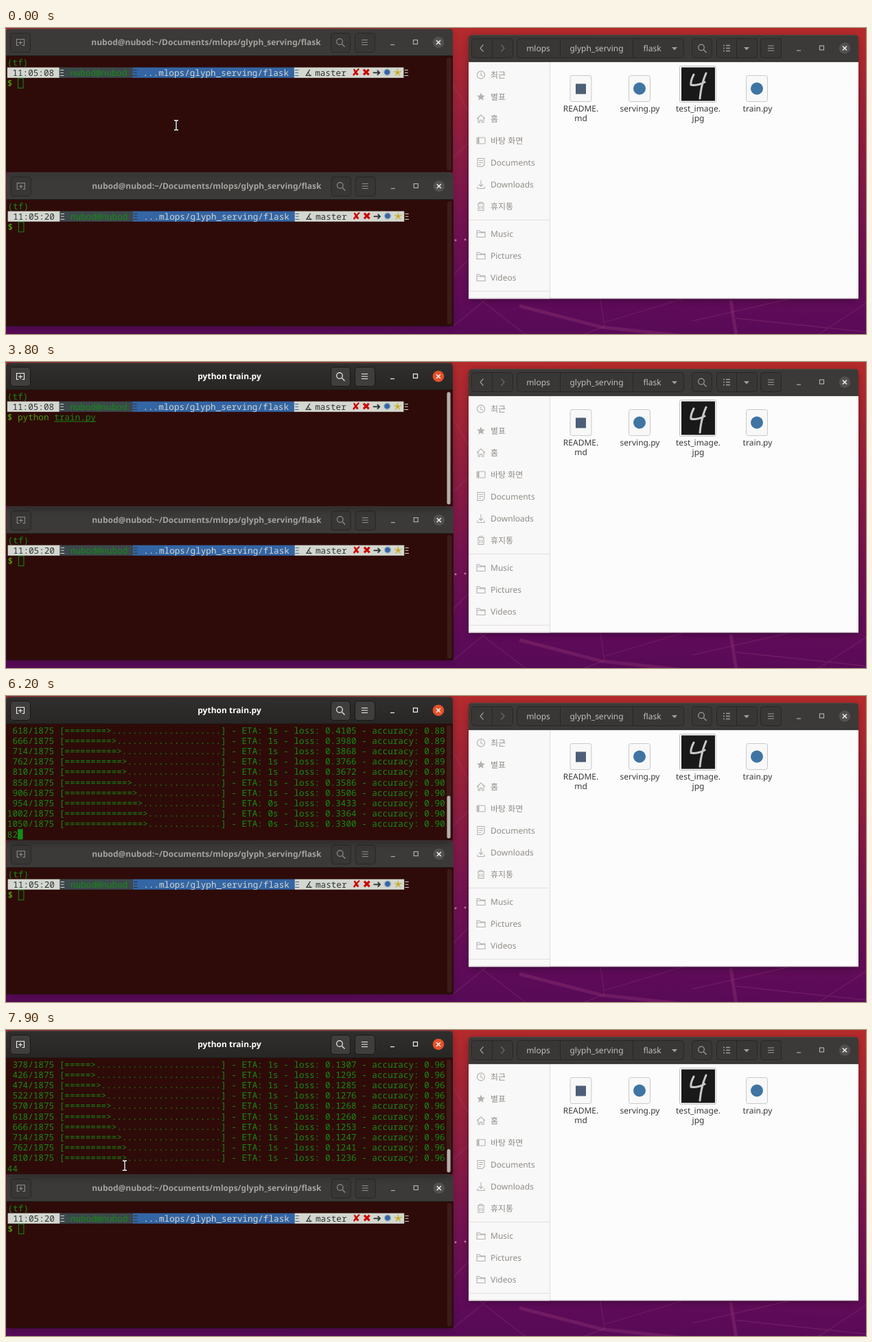
An HTML page that plays this animation: 1253 by 447 pixels, repeating every 8 s.

```html
<!DOCTYPE html>
<html lang="ko">
<head>
<meta charset="utf-8">
<title>Training run</title>
<style>
  html, body { margin: 0; width: 100%; height: 100%; overflow: hidden; background: #5d0c57; }
  svg { display: block; width: 1253px; height: 447px; }
  text { white-space: pre; text-rendering: geometricPrecision; }
  .ui { font: 12px "Noto Sans", "Noto Sans CJK KR", "Noto Sans CJK", "Open Sans", sans-serif; }
  .title { font-weight: 700; }
  .mono { font: 12.667px "Noto Sans Mono", "DejaVu Sans Mono", monospace; }
  .sym { font: 15px "DejaVu Sans", sans-serif; }
  .bold { font-weight: 700; }
</style>
</head>
<body>
<svg viewBox="0 0 1253 447">
  <defs>
    <linearGradient id="sky" x1="0.55" y1="0" x2="0.45" y2="1">
      <stop offset="0" stop-color="#b52b2c"/>
      <stop offset="0.3" stop-color="#93203c"/>
      <stop offset="0.6" stop-color="#75144e"/>
      <stop offset="0.88" stop-color="#5e0b59"/>
      <stop offset="1" stop-color="#560a56"/>
    </linearGradient>
    <linearGradient id="active" x1="0" y1="0" x2="0" y2="1">
      <stop offset="0" stop-color="#302f2e"/>
      <stop offset="1" stop-color="#272625"/>
    </linearGradient>
    <filter id="soft" x="-10%" y="-20%" width="120%" height="140%"><feGaussianBlur stdDeviation="6"/></filter>
    <path id="beam" d="M-3-7H-1L0-6 1-7H3M0-6V6M-3 7H-1L0 6 1 7H3" fill="none"/>
  </defs>
  <g id="base"></g>
  <g id="front"></g>
  <g id="mouse">
    <use href="#beam" stroke="#111" stroke-width="3"/>
    <use href="#beam" stroke="#fff" stroke-width="1.3"/>
  </g>
</svg>
<script>
const LOOP = 8000, STEP = 100;
const CW = 7.6, RH = 15.2, ROWS = 11, COLS = 84;
const BG = '#2e0b08', GREEN = '#168a16', LIME = '#4e9a06', RED = '#cc0000';
const LIGHT = '#d3d7cf', DARK = '#2e3436', SLATE = '#3c484b', BLUE = '#3465a4', DIM = '#555753';
const USER = 'nubod@nubod', DIR = 'mlops/glyph_serving/flask';
const PATH_TITLE = `${USER}:~/Documents/${DIR}`;
const COMMAND = 'python train.py';

// Drawing helpers
const esc = s => s.replace(/&/g, '&amp;').replace(/</g, '&lt;').replace(/>/g, '&gt;');
const rect = (x, y, w, h, fill, more = '') =>
  `<rect x="${x}" y="${y}" width="${w}" height="${h}" fill="${fill}" ${more}/>`;
const line = (d, color, w = 1, more = '') =>
  `<path d="${d}" fill="none" stroke="${color}" stroke-width="${w}" ${more}/>`;
const label = (x, y, s, fill, anchor = 'start', cls = 'ui') =>
  `<text class="${cls}" x="${x}" y="${y}" fill="${fill}" text-anchor="${anchor}">${esc(s)}</text>`;
const circle = (x, y, r, fill, more = '') => `<circle cx="${x}" cy="${y}" r="${r}" fill="${fill}" ${more}/>`;
const at = (x, y, s) => `<g transform="translate(${x} ${y})">${s}</g>`;
const shadow = (x, y, w, h, o) => rect(x, y, w, h, '#000', `filter="url(#soft)" opacity="${o}"`);

// Window chrome
function button(x, y, w, active) {
  return rect(x + .5, y + .5, w - 1, 28, active ? '#3f3e3c' : '#383735',
    `rx="4" stroke="${active ? '#191817' : '#292726'}"`);
}
const lens = (x, y, c) => line(`M${x + 2.5} ${y + 2.5}l4 4`, c, 1.3) + circle(x - 1, y - 1, 4.3, 'none', `stroke="${c}" stroke-width="1.2"`);
const burger = (x, y, c) => line(`M${x - 4.5} ${y - 3.5}h9m-9 3.5h9m-9 3.5h9`, c, 1.2);
function controls(x, y, active) {
  const c = active ? '#f2f0ee' : '#b0ada9';
  return line(`M${x - 70} ${y + 3.5}h6`, c, 1.2) +
    rect(x - 36.5, y - 3.5, 6, 6, 'none', `stroke="${c}" stroke-width="1.2"`) +
    circle(x, y, 8.3, active ? '#e4512a' : '#53514f') +
    line(`M${x - 3} ${y - 3}l6 6m0-6l-6 6`, '#f4f2f0', 1.5);
}
function termWindow(h, title, active, content) {
  const c = active ? '#f2f0ee' : '#918e8b';
  const titleX = title === COMMAND ? 325.5 : 291.5;
  return shadow(2, 4, 647, h - 2, active ? .4 : .2) +
    rect(0, 41, 651, h - 41, BG) +
    `<path d="M0 41V7Q0 1 6 1H645Q651 1 651 7V41Z" fill="${active ? 'url(#active)' : '#3b3a38'}"/>` +
    line('M5 1.5H646', active ? '#454341' : '#4a4846') +
    line('M0 40.5H651', '#1e1b1a') +
    line(`M.5 41V${h - .5}H650.5V41`, '#241210') +
    button(6, 7, 30, active) + button(473, 7, 29, active) + button(508, 7, 30, active) +
    line('M18.5 25.5H15.5V16.5H26.5V25.5H23.5M21 18.5v6m-3-3h6', c, 1.1) +
    lens(487, 21, c) + burger(522.5, 21, c) + controls(630, 21, active) +
    label(titleX, 25.3, title, active ? '#fff' : '#a5a29f', 'middle', 'ui title') + content;
}

// Terminal cells
const colX = c => +(1.8 + c * CW).toFixed(2);
const rowY = r => +(42.4 + r * RH).toFixed(2);
const put = (c, r, s, fill = GREEN, cls = 'mono') => label(colX(c), rowY(r) + 12.2, s, fill, 'start', cls);
const cells = (c, r, n, fill) => rect(colX(c), rowY(r), n * CW, RH, fill);
const hollow = (c, r) => rect(colX(c) + .5, rowY(r) + .5, CW, RH - .7, 'none', `stroke="${GREEN}"`);

function prompt(r, clock) {
  const icons = [['✘', RED], ['✖', RED], ['➜', DARK], ['✹', BLUE], ['✭', '#c4a000']];
  return cells(0, r, 10, LIGHT) + cells(10, r, 14, SLATE) + cells(24, r, 31, BLUE) + cells(55, r, 21, LIGHT) +
    put(1, r, clock, DARK) + put(10, r, 'Ξ', LIGHT) + put(12, r, USER) +
    put(24, r, 'Ξ', DARK) + put(26, r, '...' + DIR, LIGHT) + put(55, r, 'Ξ', BLUE) +
    put(57, r, '∡', DARK) + put(59, r, 'master', DARK) + put(76, r, 'Ξ', LIGHT) +
    icons.map(([s, c], i) => put(66 + 2 * i, r, s, c, 'sym')).join('');
}

// Training log: loss and error fall as powers of the batch number
const TOTAL = 1875, LAST = 40;
const RUN = 5000, UPDATE = 47.4;

function progress(i) {
  const first = i <= LAST, k = first ? i : i - LAST - 1;
  const n = Math.min(TOTAL, Math.max(1, 48 * k - 6)), done = n === TOTAL;
  const loss = first ? Math.min(2.4565, 5.797 * n ** -.412) : .202 * n ** -.0734;
  const error = first ? Math.min(.875, 1.365 * n ** -.388) : .045 * n ** -.035;
  const w = Math.floor(30 * n / TOTAL);
  const bar = (w ? '='.repeat(w - 1) + (done ? '=' : '>') : '') + '.'.repeat(30 - w);
  const left = i === 0 ? '7:14' : n < 100 ? '2s' : n < 940 ? '1s' : '0s';
  const time = done ? '2s 1ms/step' : 'ETA: ' + left;
  return `${String(n).padStart(4)}/${TOTAL} [${bar}] - ${time} - loss: ${loss.toFixed(4)} - accuracy: ${(1 - error).toFixed(4)}`;
}

// Key presses in tenths of a second; the cursor blink restarts at each event
const KEYS = [12, 13, 14, 15, 19, 20, 22, 23, 23, 24, 26, 28, 30, 31, 31].map(k => k * 100);
const FOCUS = 350, ENTER = 3150, REPLY = 3500, BLINK = 612;
function cursorOn(t) {
  const last = Math.max(...[FOCUS, ...KEYS, ENTER].filter(k => k <= t));
  return Math.floor((t - last) / BLINK) % 2 === 0;
}

function commandLine(r, t) {
  const n = KEYS.filter(k => k <= t).length, word = n >= 6;
  let s = put(0, r, '$', LIME, 'mono bold');
  if (t < FOCUS) return s + hollow(2, r);
  s += put(2, r, COMMAND.slice(0, Math.min(n, 6)), word ? LIME : RED, word ? 'mono' : 'mono bold');
  if (n > 7) {
    s += put(9, r, COMMAND.slice(7, n)) + rect(colX(9), rowY(r) + 13.6, (n - 7) * CW, 1, GREEN);
  }
  if (n) s += put(2 + n, r, COMMAND.slice(n), DIM);
  if (t < REPLY && cursorOn(t)) {
    const hint = n && n < COMMAND.length;
    s += cells(2 + n, r, 1, hint ? '#6a6c69' : GREEN);
    if (hint) s += put(2 + n, r, COMMAND[n], BG);
  }
  return s;
}

function terminal(t) {
  const rows = [r => put(0, r, '(tf)'), r => prompt(r, '11:05:08'), r => commandLine(r, t)];
  const say = s => rows.push(r => put(0, r, s));
  let tail = '';
  if (t >= RUN) say('Epoch 1/5');
  const count = t > RUN ? Math.max(1, Math.floor((t - RUN - 100) / UPDATE)) : 0;
  for (let i = 0; i < count; i++) {
    const s = progress(i);
    say(s.slice(0, COLS));
    tail = s.slice(COLS);
    if (i === LAST) {
      say(tail);
      say('Epoch 2/5');
      tail = '';
    }
  }
  if (t >= REPLY) {
    rows.push(r => put(0, r, tail) + (cursorOn(t) ? cells(tail.length, r, 1, GREEN) : ''));
  }
  const total = rows.length;
  const thumb = total < ROWS ? 164 : Math.max(34, 164 * ROWS / (total + 1));
  const bar = rect(642, 43, 7, 165, '#3c1b18', 'rx="3"') +
    (t >= FOCUS ? rect(642.5, 208 - thumb, 5, thumb, '#b5b0ac', 'rx="2.5"') : '');
  return rows.slice(-ROWS).map((f, r) => f(r)).join('') + bar;
}

// Desktop and file manager
function wallpaper() {
  const c = '#c25a8c', faint = 'opacity=".2"';
  return rect(0, 0, 1253, 447, 'url(#sky)') +
    line('M748 406L868 437L990 450M1056 398L1064 450', c, 5, faint) +
    line('M651 436L700 396M690 396L760 450M866 396L872 436L835 450M872 430L985 396M1000 428L1140 396M1064 424L1253 444M1180 450L1253 402', c, 1.3, faint) +
    line('M651 82L674 122M651 190L674 168M651 362L674 338', c, 1.3, faint) +
    circle(655, 310, 1.5, '#c67ba2') + circle(669, 309, 1.5, '#c67ba2');
}

function sidebar() {
  const g = '#b3b1ae';
  const folder = line('M-6-4.5h4l1.5 2h6.5v7.5h-12zM-6-1.5h12', g, 1.1);
  const items = [
    ['최근', circle(0, 0, 5.6, 'none', `stroke="${g}" stroke-width="1.1"`) + line('M0-3.5V.5L3 2', g, 1.1)],
    ['별표', `<path d="M0-6L1.7-2 6-1.8 2.7 1 3.8 5.2 0 2.9-3.8 5.2-2.7 1-6-1.8-1.7-2Z" fill="${g}"/>`],
    ['홈', line('M-6 0L0-5.5 6 0M-4-1V5.5H-1.5V2H1.5V5.5H4V-1', g, 1.1)],
    ['바탕 화면', rect(-6, -4.5, 12, 9, 'none', `rx="1" stroke="${g}" stroke-width="1.1"`) + rect(-5, -4, 2.5, 8, g)],
    ['Documents', line('M-5-6H5V3L2 6H-5ZM-3-3H3M-3 0H3M-3 3H0', g, 1.1)],
    ['Downloads', line('M0-6V3M-3 0L0 3 3 0M-5 3V6H5V3', g, 1.1)],
    ['휴지통', line('M-5-4H5M-2-4V-6H2V-4M-4-4V6H4V-4M-1.5-1V4M1.5-1V4', g, 1.1)],
    ['Music', folder], ['Pictures', folder], ['Videos', folder]
  ];
  return items.map(([name, icon], i) => {
    const y = 68.5 + 32 * i + (i > 6 ? 8 : 0);
    return at(692, y, icon) + label(706, y + 4.3, name, '#8f8d87');
  }).join('') + line('M674 280.5H792M674 384.5H792', '#e2e0de');
}

function files() {
  const page = x => rect(x - 15.5, 69.5, 31, 38, '#f8f8f8', 'rx="3" stroke="#c9c9c9"');
  const script = x => page(x) + circle(x, 88.5, 9, '#3f74a3');
  const name = (x, a, b = '') => label(x, 121.5, a, '#3a3a3a', 'middle') + label(x, 135.8, b, '#3a3a3a', 'middle');
  return page(837.5) + rect(830, 81.5, 15, 15, '#4d5f78') + script(923) + script(1094) +
    rect(981.5, 55.5, 53, 53, '#fff', 'rx="2" stroke="#c4c4c4"') + rect(984, 57.5, 49, 49, '#191919') +
    line('M1002 68Q997 78 998 83Q1006 85 1018 79M1020 66Q1013 82 1011 103', '#c9c9c9', 3, 'stroke-linecap="round"') +
    name(837.5, 'README.', 'md') + name(923.5, 'serving.py') + name(1008.5, 'test_image.', 'jpg') + name(1095, 'train.py');
}

function fileWindow() {
  const c = '#c2bfbb', dim = '#a09d99', edge = '#292726';
  const caret = x => `<path d="M${x - 4} 28h8l-4 4.5z" fill="${dim}"/>`;
  return shadow(676, 14, 564, 382, .45) + rect(674, 49, 568, 346.5, '#fcfcfc') + rect(674, 49, 118, 346.5, '#f9f8f8') +
    line('M792.5 49V395', '#dfdddb') +
    '<path d="M674 49.5V16Q674 10 680 10H1236Q1242 10 1242 16V49.5Z" fill="#3c3a38"/>' +
    line('M679 10.5H1237', '#4b4947') + line('M674 49H1242', '#262423') +
    [[678, 61], [744, 244], [999, 30], [1035, 60], [1099, 31]].map(([x, w]) => button(x, 15, w)).join('') +
    line('M708.5 16V43M807.5 16V43M913.5 16V43M1064.5 16V43', edge) +
    line('M695.5 24.5L691 29.5 695.5 34.5', dim, 1.2) + line('M721.5 24.5L726 29.5 721.5 34.5', '#6d6a67', 1.2) +
    label(775.5, 34, 'mlops', c, 'middle') + label(860.5, 34, 'glyph_serving', c, 'middle') +
    label(941.5, 34, 'flask', c, 'middle') + caret(974) + caret(1079) +
    lens(1014, 29.5, dim) + line('M1045 25.5h2m2 0h6m-10 4h2m2 0h6m-10 4h2m2 0h6', dim, 1.5) +
    burger(1114.5, 29.5, dim) + controls(1222, 29.5, false) + sidebar() + files() +
    rect(674, 394.5, 568, 1, '#8d8a88', 'opacity=".5"');
}

// The pointer drifts, hides while typing and later comes back into the log
const ease = (t, a, b) => Math.min(1, Math.max(0, (t - a) / (b - a)));
function pointer(t) {
  const click = ease(t, 200, 600), back = ease(t, 6600, 6900), down = ease(t, 6900, 7500);
  const x = 248 + 14 * click - 86 * back - 3 * down;
  const y = 142 + 3 * click + 7 * back + 46 * down;
  return { x, y, seen: t < KEYS[0] || t >= 6600 };
}

const base = document.getElementById('base');
const front = document.getElementById('front');
const mouse = document.getElementById('mouse');

const second = put(0, 0, '(tf)') + prompt(1, '11:05:20') + put(0, 2, '$', LIME, 'mono bold') + hollow(2, 2) +
  rect(642, 43, 7, 180, '#3c1b18', 'rx="3"');
base.innerHTML = wallpaper() + fileWindow() + at(.8, 210, termWindow(225.5, PATH_TITLE, false, second));

const start = performance.now();
let shown = -1;

function draw() {
  const t = Math.floor((performance.now() - start) % LOOP / STEP) * STEP;
  if (t !== shown) {
    shown = t;
    const p = pointer(t);
    front.innerHTML = termWindow(210.5, t < ENTER ? PATH_TITLE : COMMAND, t >= FOCUS, terminal(t));
    mouse.setAttribute('transform', `translate(${p.x} ${p.y})`);
    mouse.setAttribute('visibility', p.seen ? 'visible' : 'hidden');
  }
  requestAnimationFrame(draw);
}
draw();
</script>
</body>
</html>
```
